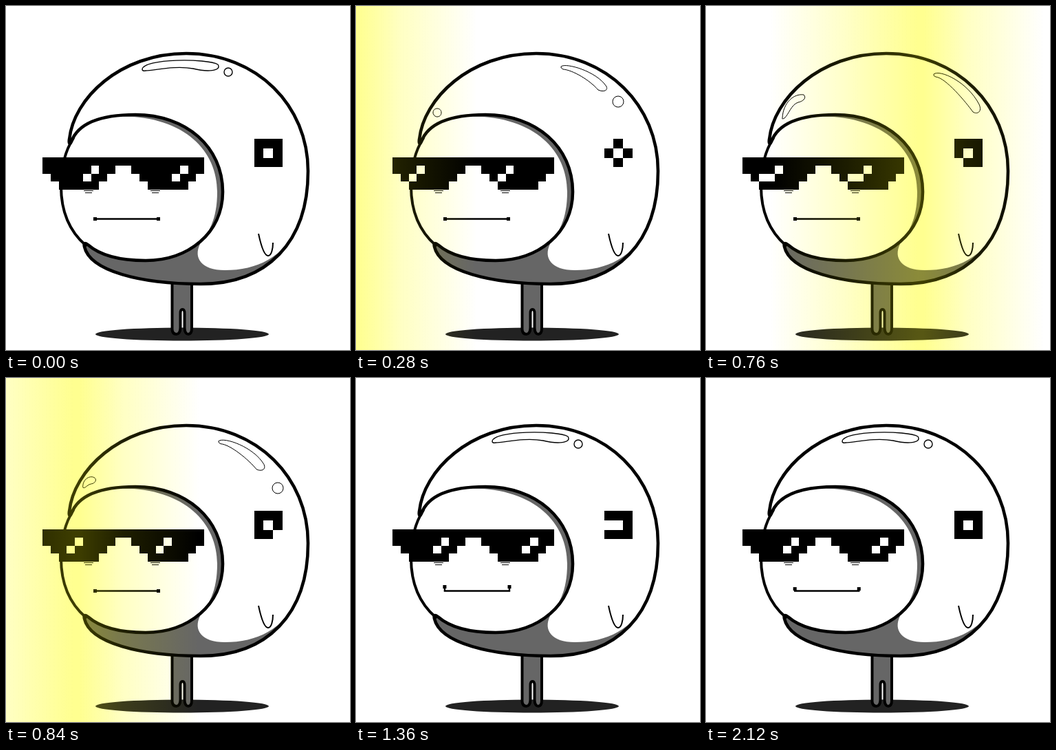
These frames come from a looping animation (500x500 px, 2.2 s). An HTML page:

```html
<!DOCTYPE html>
<html lang="en">
<head>
<meta charset="utf-8">
<title>Cool helmet</title>
<style>
  html, body { margin: 0; width: 100%; height: 100%; overflow: hidden; background: #fff; }
  svg { display: block; width: 100vw; height: 100vh; isolation: isolate; }
  .line { fill: none; stroke: #000; stroke-width: 4.6; stroke-linecap: round; stroke-linejoin: round; }
  .thin { fill: none; stroke: #000; stroke-width: 1.4; }
  .shade { fill: #666; }
  .white { fill: #fff; }
  .multiply { mix-blend-mode: multiply; opacity: .26; }
  .tint { opacity: .24; }
</style>
</head>
<body>
<svg viewBox="0 0 500 500">
  <defs>
    <linearGradient id="glow">
      <stop offset="0" stop-color="#ff0" stop-opacity="0"/>
      <stop offset=".27" stop-color="#ff0" stop-opacity=".45"/>
      <stop offset=".54" stop-color="#ff0"/>
      <stop offset=".56" stop-color="#ff0"/>
      <stop offset=".72" stop-color="#ff0" stop-opacity=".5"/>
      <stop offset="1" stop-color="#ff0" stop-opacity="0"/>
    </linearGradient>
    <clipPath id="face"><path d="M93 199C105 165 150 158 188 158C262 158 315 205 315 270C315 330 265 370 203 370C160 370 130 358 114 346C92 325 80 300 80 262C80 235 85 212 93 199Z"/></clipPath>
  </defs>

  <ellipse cx="256" cy="477" rx="126" ry="9.5" fill="#222"/>
  <path class="white" d="M254 467V447Q256.500 441 259 447V467Z"/>
  <path class="line shade" style="fill:#666;stroke-width:4" d="M241.500 400V470Q242 477 247.500 477Q253 477 253.500 468V447Q253.500 441 256.500 441Q259.500 441 259.500 447V468Q260 477 265 477Q270 477 270 468V400"/>

  <path class="shade" d="M93 199C98 135 165 69 262 69C365 69 439 145 439 240C439 343 380 404 283 404C195 404 122 385 114 346Z"/>
  <path class="white" d="M93 199C98 135 165 69 262 69C365 69 439 145 439 240C439 268 436 296 428 318C402 366 365 384 318 384C284 384 272 366 282 346L200 260Z"/>
  <g clip-path="url(#face)">
    <rect class="shade" x="70" y="150" width="260" height="230"/>
    <path class="white" d="M60 150L150 161C255 154 307 208 307 270C307 310 295 332 276 350L240 390H60Z"/>
  </g>
  <path class="line" style="stroke-width:4" d="M98 192C85 212 80 235 80 262C80 300 94 329 116 348"/>
  <path class="line" d="M114 350C122 385 195 404 283 404C380 404 439 343 439 240C439 145 365 69 262 69C165 69 98 135 92 194C91 200 93 202 95 197C107 165 150 158 188 158C262 158 315 205 315 270C315 330 265 370 203 370C160 370 134 360 119 347Q112 342 114 350"/>
  <path class="thin" style="stroke-width:2" d="M367 331C370 345 375 363 381 363C386 363 388 352 388 344"/>
  <path class="thin" style="stroke-width:1" d="M113 268.500h14M115 271.500h10M210 268.500h14M212 271.500h10"/>

  <g id="shine" class="thin">
    <path id="oldStreak"/><path id="newStreak"/>
    <ellipse id="oldDot"/><ellipse id="newDot"/>
  </g>
  <path id="glasses" shape-rendering="crispEdges"/>
  <path id="glints" class="white" shape-rendering="crispEdges"/>
  <path id="badge" shape-rendering="crispEdges"/>
  <path id="mouth" class="thin" style="stroke-width:2.400"/>
  <path id="corners"/>

  <rect class="light multiply" width="395" height="500" fill="url(#glow)"/>
  <rect class="light tint" width="395" height="500" fill="url(#glow)"/>
</svg>
<script>
const LOOP = 2200, STEP = 40;
const $ = id => document.getElementById(id);
const lights = document.querySelectorAll('.light');

const rest = 'M198 92C200 76 292 76 308 85C314 95 292 96 272 91C245 86 215 94 203 94Q198 95 198 92Z';
const leaving = [
  [-1, rest],
  [0, 'M180 96C184 84 225 78 248 79C254 83 250 88 238 88C215 89 195 96 183 97Q180 98 180 96Z'],
  [3, 'M111 163C112 140 128 127 142 129C147 134 140 139 134 140C124 143 120 158 114 163Q110 165 111 163Z'],
  [6, 'M112 155C112 147 124 147 124 155C124 159 121 161 118 161C116 161 114 160 113 158Q112 157 112 155Z']
];
const entering = end => [
  [1, 'M392 125C400 128 412 155 414 170C416 178 408 176 405 170C400 155 396 138 393 128Q391 126 392 125Z'],
  [3, 'M331 99C340 92 380 110 397 143C402 154 394 158 388 154C378 140 348 104 334 103Q330 102 331 99Z'],
  [6, 'M298 88C305 82 350 95 364 117C367 124 358 125 352 122C340 108 315 93 301 92Q297 90 298 88Z'],
  [end, rest]
];
const arrivingDot = end => [[5, '395 160 8 8'], [6, '381 139 8 8'], [end, '323 96 6 6']];

// Blends the numbers inside two strings that share one layout.
function tween(keys, k) {
  const i = keys.findIndex(([at]) => at >= k);
  if (i < 0) return keys[keys.length - 1][1];
  if (i === 0) return keys[0][1];
  const [a, from] = keys[i - 1], [b, to] = keys[i];
  const goal = to.match(/[\d.]+/g).map(Number), p = (k - a) / (b - a);
  let n = 0;
  return from.replace(/[\d.]+/g, v => +(+v + (goal[n++] - v) * p).toFixed(2));
}

function show(el, on) { el.style.display = on ? '' : 'none'; }

function placeDot(el, text) {
  const v = text.split(' ');
  ['cx', 'cy', 'rx', 'ry'].forEach((name, i) => el.setAttribute(name, v[i]));
}

const PX = 11.75;
const block = (col, row, w = 1) =>
  `M${53 + col * PX} ${220 + row * PX}h${w * PX}v${PX}h${-w * PX}z`;

$('glasses').setAttribute('d', block(0, 0, 20) + [1, 2, 3].map(r =>
  block(r - 1, r, 11 - 2 * r) + block(10 + r, r, 11 - 2 * r)).join(''));

function drawGlints(shift, wide) {
  $('glints').setAttribute('d', [0, 11].map(lens =>
    block(lens + 6 - shift, 1) + block(lens + 5 - shift - wide, 2, 1 + wide)).join(''));
}

// Border cells of the badge, counterclockwise from the top.
const ring = [[1, 0], [0, 0], [0, 1], [0, 2], [1, 2], [2, 2], [2, 1], [2, 0]];

function badgeHides(t) {
  if (t >= 40 && t < 480) {
    const odd = Math.floor((t - 40) / 120) % 2 === 0 ? 1 : 0;
    return i => i % 2 === odd;
  }
  let gap = -1;
  if (t >= 640 && t < 1200) gap = Math.min((t - 640) / STEP, 5);
  else if (t >= 1200 && t < 1680) gap = (6 + (t - 1200) / STEP) % 8;
  return i => i === gap;
}

function drawBadge(t) {
  const hidden = badgeHides(t), s = 13.67;
  $('badge').setAttribute('d', ring.map(([x, y], i) => hidden(i) ? '' :
    `M${360.8 + x * s} ${193.2 + y * s}h${s}v${s}h${-s}z`).join(''));
}

function drawMouth(t) {
  const lift = t < 1200 ? 0 : t < 1280 || t >= 2120 ? 3 : 6;
  const left = 129.5 - lift / 10, right = 221.5 + lift / 4, y = 309.5;
  $('mouth').setAttribute('d', `M${left} ${y - lift}V${y}H${right}V${y - lift}`);
  $('corners').setAttribute('d', [left, right].map(x =>
    `M${x - 2.5} ${y - 2.5 - lift}h5v5h-5z`).join(''));
}

function drawSweep(k, end) {
  const moving = k >= 0 && k < end;
  lights.forEach(el => {
    show(el, moving);
    el.setAttribute('x', 410 - 105 * k);
  });
  $('shine').style.strokeWidth = moving ? 1 : 1.4;
  show($('oldStreak'), moving && k < 8);
  show($('oldDot'), moving && k < 1);
  show($('newStreak'), !moving || k > 0);
  show($('newDot'), !moving || k > 4);
  if (moving) {
    $('oldStreak').setAttribute('d', tween(leaving, k));
    placeDot($('oldDot'), '279 86 14 4');
  }
  $('newStreak').setAttribute('d', moving ? tween(entering(end), k) : rest);
  placeDot($('newDot'), moving ? tween(arrivingDot(end), k) : '323 96 6 6');

  const shift = !moving || k >= end - 1 ? 0 : k >= 8 ? -1 : Math.min(1 + Math.floor(k / 3), 3);
  drawGlints(shift, moving && k === 3 ? 1 : 0);
}

function frame(now) {
  const t = Math.floor((now % LOOP) / STEP) * STEP;
  const second = t >= 640;
  drawSweep((t - (second ? 640 : 40)) / STEP, second ? 9 : 11);
  drawBadge(t);
  drawMouth(t);
  requestAnimationFrame(frame);
}
frame(performance.now());
</script>
</body>
</html>
```
